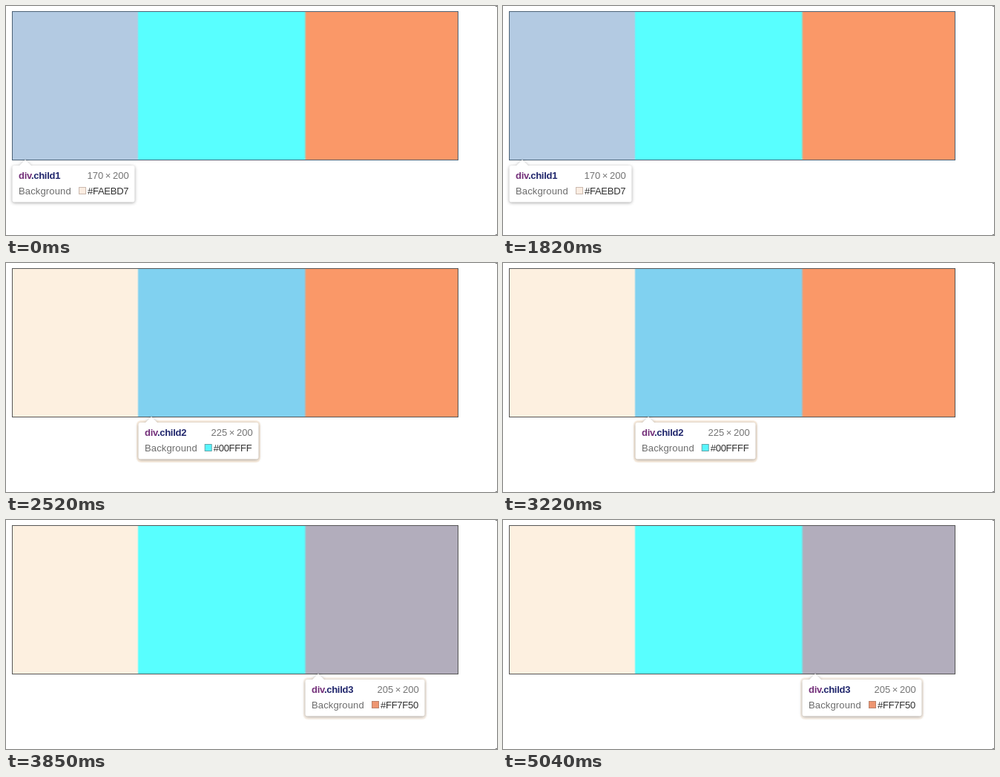
An HTML page for the animation above (5.11 s loop, 662 px wide and 310 px high).

```html
<!DOCTYPE html>
<html lang="en">
<head>
<meta charset="utf-8">
<title>Flex children inspected</title>
<style>
  html, body { margin: 0; width: 100%; height: 100%; overflow: hidden; background: #fff; }
  svg { display: block; width: 662px; height: 310px; }
  text { font: 13px "Liberation Sans", Arial, sans-serif; fill: #6c6c6c; }
  .name { font-weight: bold; letter-spacing: -.29px; fill: #20266c; }
  .tag { fill: #74307a; }
  .label { letter-spacing: .14px; }
  .size { fill: #747474; }
  .hex { letter-spacing: -.26px; fill: #303030; }
  .end { text-anchor: end; }
  .tip { fill: #fff; filter: drop-shadow(0 1px 2px rgba(0, 0, 0, .36)); }
</style>
</head>
<body>
<svg id="stage" viewBox="0 0 662 310"></svg>
<script>
const LOOP = 5110;
const EDGES = [8, 178, 403, 610];
const BASE = ['#fdf0e0', '#58ffff', '#fa9868'];

const SCENES = [
  { from: 0, to: 1890, lit: '#b3cae2', frame: '#4b6175', left: 8.5, width: 165,
    size: [170, 200], hex: '#FAEBD7', hexX: 110, swatch: '#fbede2', rim: '#cbb9ae', halo: 'none' },
  { from: 1890, to: 3290, lit: '#80d1f0', frame: '#555', left: 178.5, width: 162,
    size: [225, 200], hex: '#00FFFF', hexX: 279.7, swatch: '#58f6ff', rim: '#62a5aa', halo: '#fdf1e3' },
  { from: 3290, to: LOOP, lit: '#b2adbc', frame: '#555', left: 403.5, width: 161,
    size: [205, 200], hex: '#FF7F50', hexX: 505, swatch: '#ee9672', rim: '#b9826c', halo: '#fdf5ec' },
];

const rect = (x, y, w, h, fill, extra = '') =>
  `<rect x="${x}" y="${y}" width="${w}" height="${h}" fill="${fill}" ${extra}/>`;
const text = (x, y, cls, body) => `<text x="${x}" y="${y}" class="${cls}">${body}</text>`;

function panels(scene, index) {
  const fills = BASE.map((color, i) => i === index ? scene.lit : color);
  const blocks = fills.map((fill, i) => rect(EDGES[i], 7, EDGES[i + 1] - EDGES[i], 202, fill));
  const seams = [0, 1].map(i => {
    const id = `seam${index}${i}`;
    const x = EDGES[i + 1];
    return `<linearGradient id="${id}"><stop stop-color="${fills[i]}"/>` +
      `<stop offset="1" stop-color="${fills[i + 1]}"/></linearGradient>` +
      rect(x - 1, 8, i ? 3 : 2, 200, `url(#${id})`);
  });
  return [...blocks, ...seams,
    rect(8.5, 7.5, 601, 201, 'none', `stroke="${scene.frame}"`)].join('');
}

function tooltip(s, index) {
  const { left, width } = s;
  const start = left + 8.5;
  const end = left + width - 8;
  const [w, h] = s.size;
  const outline = `M${left + 3} 216h${6.5}l8-8l8 8H${left + width - 3}q3 0 3 3v43.5q0 3-3 3` +
    `H${left + 3}q-3 0-3-3V219q0-3 3-3z`;
  return rect(left - 2.5, 213, width + 5, 57, s.halo, 'rx="6"') +
    `<path class="tip" d="${outline}"/>` +
    text(start, 234, 'name', `<tspan class="tag">div</tspan>.child${index + 1}`) +
    text(end - 34.2, 234, 'size end', w) +
    text(end - 28, 234, 'size end" text-anchor="middle', '').replace(/<text.*<\/text>/, '') +
    text(end - 24.2, 234, 'size end', '×') +
    text(end + .3, 234, 'size end', h) +
    text(start, 255, 'label', 'Background') +
    rect(s.hexX - 11.5, 245.5, 9, 9, s.swatch, `stroke="${s.rim}"`) +
    text(s.hexX, 255, 'hex', s.hex);
}

const stage = document.getElementById('stage');
stage.innerHTML = SCENES.map((s, i) => `<g>${panels(s, i)}${tooltip(s, i)}</g>`).join('') +
  rect(660, 0, 2, 1, '#777') + rect(660, 309, 2, 1, '#777');

SCENES.forEach(({ from, to }, i) => {
  const shownAt = time => time >= from && time < to ? 1 : 0;
  const times = [0, ...SCENES.map(s => s.to)];
  stage.children[i].animate(
    times.map(t => ({ offset: t / LOOP, opacity: shownAt(t), easing: 'step-end' })),
    { duration: LOOP, iterations: Infinity });
});
</script>
</body>
</html>
```
